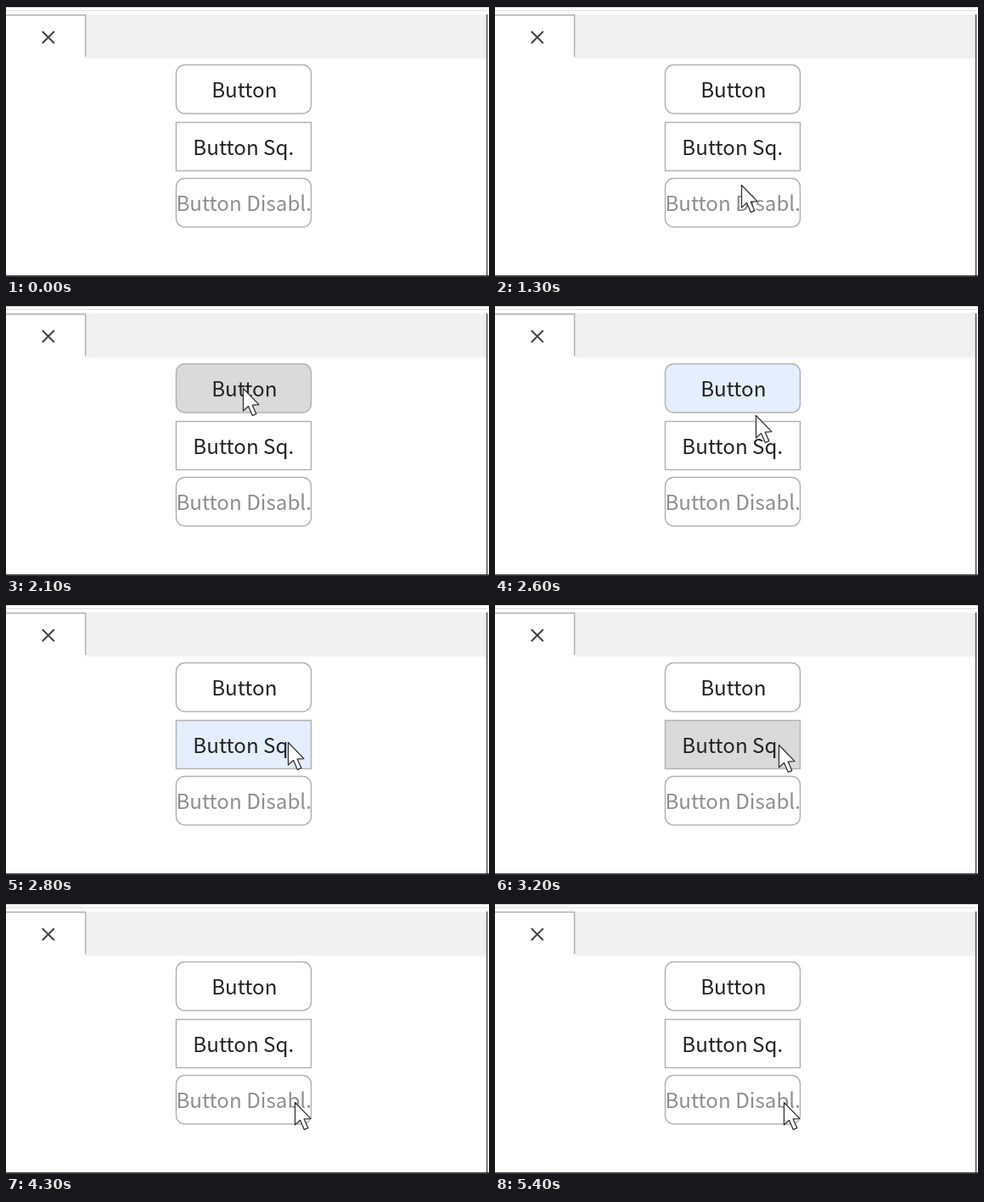
These frames come from a looping animation (569x320 px, 5500 ms). An HTML page:

```html
<!DOCTYPE html>
<html lang="en">
<head>
<meta charset="utf-8">
<title>Button states</title>
<style>
  html, body { margin: 0; width: 100%; height: 100%; overflow: hidden; background: #fff; }
  svg { display: block; width: 100vw; height: 100vh; }
  text { font: 24.2px "Noto Sans CJK SC", "Noto Sans CJK JP", "Noto Sans CJK", sans-serif; text-anchor: middle; fill: #222; }
  .btn rect { fill: #fff; stroke: #b2b2b2; stroke-width: 1.5; }
  .btn.hover rect { fill: #e4eeff; }
  .btn.press rect { fill: #dadada; }
  .btn.off text { fill: #8e8e8e; }
</style>
</head>
<body>
<svg viewBox="0 0 569 320">
  <rect y="5" width="567" height="1" fill="#dedede"/>
  <rect y="10" width="566" height="52" fill="#f0f0f0"/>
  <rect y="11" width="93" height="51" fill="#fff"/>
  <path d="M0 10.7H93.6V60" fill="none" stroke="#b0b0b0" stroke-width="1.4"/>
  <path d="M94 62H566" stroke="#f7f7f7" stroke-width="2"/>
  <path d="M42.8 30L56.8 44M56.8 30L42.8 44" stroke="#444" stroke-width="2"/>
  <path d="M566.6 10V319" stroke="#555" stroke-width="1.6"/>
  <path d="M0 .4H569M0 319H569" stroke="#000" stroke-width="1.6"/>

  <g class="btn" id="round">
    <rect x="200.5" y="69.5" width="159" height="57.5" rx="10"/>
    <text x="280.8" y="108.3">Button</text>
  </g>
  <g class="btn" id="square">
    <rect x="200.5" y="137.5" width="159" height="57"/>
    <text x="279.8" y="176.3">Button Sq.</text>
  </g>
  <g class="btn off">
    <rect x="200.5" y="203.5" width="159" height="57.5" rx="10"/>
    <text x="280.2" y="242.3">Button Disabl.</text>
  </g>

  <path id="cursor" d="M.5 .5V27L6.6 21.6L11.3 32.6L15.8 30.6L11.2 20.2L19 19.6Z"
        fill="#fff" stroke="#333" stroke-width="1.3" stroke-linejoin="round"/>
</svg>
<script>
  const LOOP = 5500;
  // time, pointer x, pointer y
  const moves = [
    [1300, 290, 211], [1400, 287, 172], [1500, 283, 130], [1600, 280, 104], [1700, 279, 98],
    [2500, 288, 107], [2600, 307, 130], [2700, 323, 150], [2800, 332, 163], [2900, 334, 166],
    [3500, 343, 194], [3600, 352, 225], [3700, 353, 236], [3800, 349, 239], [3900, 343, 237], [4000, 340, 235]
  ];
  // time, state
  const states = {
    round: [[0, ""], [1600, "hover"], [2100, "press"], [2200, "hover"], [2700, ""]],
    square: [[0, ""], [1500, "hover"], [1600, ""], [2700, "hover"], [3200, "press"], [3300, "hover"], [3600, ""]]
  };
  const el = id => document.getElementById(id);
  const latest = (steps, t) => steps.filter(s => s[0] <= t).pop();

  function draw(t) {
    const at = latest(moves, t);
    el("cursor").style.display = at ? "" : "none";
    if (at) el("cursor").setAttribute("transform", `translate(${at[1]} ${at[2]})`);
    for (const id in states) el(id).setAttribute("class", "btn " + latest(states[id], t)[1]);
  }

  const start = performance.now();
  function tick() {
    draw((performance.now() - start) % LOOP);
    requestAnimationFrame(tick);
  }
  tick();
</script>
</body>
</html>
```
